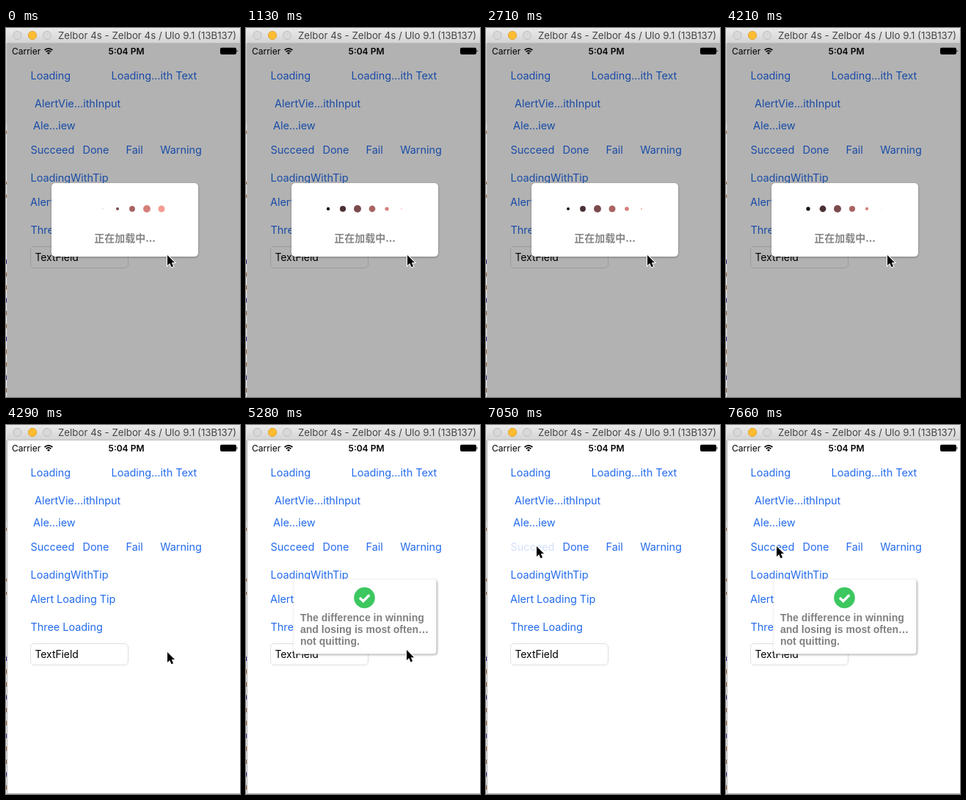
An HTML page that plays this animation: 319x502 px, repeating every 8 s.

```html
<!DOCTYPE html>
<html lang="en">
<head>
<meta charset="utf-8">
<title>Loading and toast demo</title>
<style>
  html, body { margin: 0; width: 100%; height: 100%; overflow: hidden; background: #fff; }
  svg { display: block; width: 100%; height: 100%; }
  text { font-family: Inter, Roboto, sans-serif; white-space: pre; }
  .status { font-size: 12px; }
  .links { font-size: 14.5px; letter-spacing: -.06px; fill: #246bed; }
  .loading { font: bold 14px "Noto Sans CJK SC", "Noto Sans CJK", sans-serif; fill: #868686; }
  .toast text { font: bold 14px "Liberation Sans", Arial, sans-serif; fill: #808080; }
  .modal-card { filter: drop-shadow(.5px 1px 1.5px rgba(0, 0, 0, .3)); }
  .toast-card { filter: drop-shadow(1px 1px 1.5px rgba(0, 0, 0, .4)); }
</style>
</head>
<body>
<svg viewBox="0 0 319 502">
  <defs>
    <linearGradient id="bar" x2="0" y2="1">
      <stop stop-color="#ebebeb"/><stop offset="1" stop-color="#d3d3d3"/>
    </linearGradient>
  </defs>

  <!-- desktop sliver and simulator window -->
  <rect width="319" height="502" fill="#ebe8e8"/>
  <rect y="21" width="2" height="110" fill="#cfcdce"/>
  <g id="code"></g>
  <rect x="2" y="21" width="317" height="480" fill="#fff"/>
  <path d="M1.5 21V502M1 501.5H319" stroke="#b4b4b4" fill="none"/>
  <rect x="1" width="318" height="21" fill="url(#bar)"/>
  <path d="M1 20.5H319" stroke="#bdbdbd"/>
  <g fill="#d8d8d8" stroke="#bebebe">
    <circle cx="15.5" cy="10" r="5.6"/>
    <circle cx="36" cy="10" r="5.6" fill="#fdbd2f" stroke="#e2a337"/>
    <circle cx="56" cy="10" r="5.6"/>
  </g>
  <text x="71" y="15" font-size="13.3" fill="#454545">Zelbor 4s - Zelbor 4s / Ulo 9.1 (13B137)</text>

  <!-- status bar -->
  <g class="status">
    <text x="8" y="35.5">Carrier</text>
    <text x="164" y="35.5" text-anchor="middle" font-weight="600">5:04 PM</text>
  </g>
  <path d="M52.6 30.2a7.6 7.6 0 0 1 10.8 0M54.7 32.3a4.6 4.6 0 0 1 6.6 0" fill="none" stroke="#000" stroke-width="1.7"/>
  <path d="M58 36l-2-2.1a2.9 2.9 0 0 1 4 0z"/>
  <rect x="292" y="26.7" width="22" height="9.2" rx="1.8"/>
  <path d="M314.6 29.5q2.2 1.8 0 3.6z"/>

  <g class="links">
    <text x="33.5" y="70">Loading</text>
    <text x="143.5" y="70">Loading…ith Text</text>
    <text x="39" y="108">AlertVie…ithInput</text>
    <text x="37" y="138">Ale…iew</text>
    <text x="33.5" y="171" id="succeed">Succeed</text>
    <text x="104.5" y="171">Done</text>
    <text x="163.5" y="171">Fail</text>
    <text x="210.3" y="171">Warning</text>
    <text x="33.5" y="209">LoadingWithTip</text>
    <text x="33" y="241.5">Alert Loading Tip</text>
    <text x="33.5" y="280">Three Loading</text>
  </g>
  <rect x="33.5" y="297.5" width="133" height="29" rx="4.5" fill="#fff" stroke="#dedede"/>
  <text x="39.5" y="317" font-size="14" letter-spacing="-.1">TextField</text>

  <g id="modal">
    <rect x="2" y="21" width="317" height="480" opacity=".3"/>
    <rect class="modal-card" x="62" y="211" width="200" height="100" rx="5" fill="#fff"/>
    <g id="dots"></g>
    <text class="loading" x="162" y="291" text-anchor="middle">正在加载中...</text>
  </g>

  <g id="toast" class="toast">
    <rect class="toast-card" x="65" y="210" width="194.5" height="101.5" rx="4" fill="#fff"/>
    <circle cx="161.5" cy="235" r="14.3" fill="#3cc75f"/>
    <path d="M155 235l4.8 4.7 8.4-8.4" fill="none" stroke="#fff" stroke-width="3.4"/>
    <text x="74" y="267">The difference in winning</text>
    <text x="74" y="283">and losing is most often…</text>
    <text x="74" y="299">not quitting.</text>
  </g>

  <path id="cursor" d="M0 0V14L3.2 11 5.5 16.3 8 15.2 5.8 10.1H10Z" stroke="#fff" stroke-width="2" paint-order="stroke"/>
</svg>
<script>
const LOOP = 8000, STEP = 87.8;
const DOT_PERIOD = 1560, DOT_LAG = 200;
const DOT_COLORS = ['#17171a', '#4a2f33', '#7a4a4d', '#aa6462', '#d67f7a', '#f49b93'];
const CURSOR_PATH = [ // time, x, y
  [0, 220, 309], [5190, 220, 309], [5270, 219, 306], [5620, 185, 273],
  [5720, 185, 273], [6234, 122, 191], [6580, 69, 165], [LOOP, 69, 165]
];

const $ = id => document.getElementById(id);
const add = (parent, tag, attrs) => {
  const node = document.createElementNS('http://www.w3.org/2000/svg', tag);
  for (const key in attrs) node.setAttribute(key, attrs[key]);
  return parent.appendChild(node);
};
const ramp = (t, start, length) => Math.min(1, Math.max(0, (t - start) / length));
const ease = p => p * p * (3 - 2 * p);

const dots = DOT_COLORS.map((fill, i) => add($('dots'), 'circle', { cx: 112 + 20 * i, cy: 246, fill }));

for (let i = 0; i < 11; i++)
  add($('code'), 'rect', { y: 315 + 17.5 * i, width: 1.5, height: 6, fill: i % 3 ? '#9b6032' : '#30308c' });
for (const y of [140, 209, 227])
  add($('code'), 'rect', { y, width: 1.5, height: 4, fill: '#a5622c' });

function cursorAt(t) {
  const i = CURSOR_PATH.findIndex(p => p[0] > t);
  const [t0, x0, y0] = CURSOR_PATH[i - 1], [t1, x1, y1] = CURSOR_PATH[i];
  const p = (t - t0) / (t1 - t0);
  return [x0 + (x1 - x0) * p, y0 + (y1 - y0) * p];
}

function draw(t) {
  dots.forEach((dot, i) => {
    const phase = (t + (4.2 - i) * DOT_LAG) / DOT_PERIOD;
    dot.setAttribute('r', 2.5 + 2.5 * Math.cos(2 * Math.PI * phase));
  });
  $('modal').style.display = t < 4300 ? '' : 'none';

  const toast = t < 7000
    ? ease(ramp(t, 4300, 250)) - ease(ramp(t, 5795, 520))
    : ease(ramp(t, 7210, 250));
  $('toast').setAttribute('opacity', toast);

  const pressed = t >= 7000;
  $('succeed').setAttribute('opacity', pressed ? .2 + .8 * ramp(t, 7220, 400) : 1);
  $('cursor').setAttribute('transform', `translate(${cursorAt(t)})`);
}

function tick() {
  const t = performance.now() % LOOP;
  draw(Math.min(LOOP - 1, Math.floor((t + 20) / STEP) * STEP));
  requestAnimationFrame(tick);
}
tick();
</script>
</body>
</html>
```
